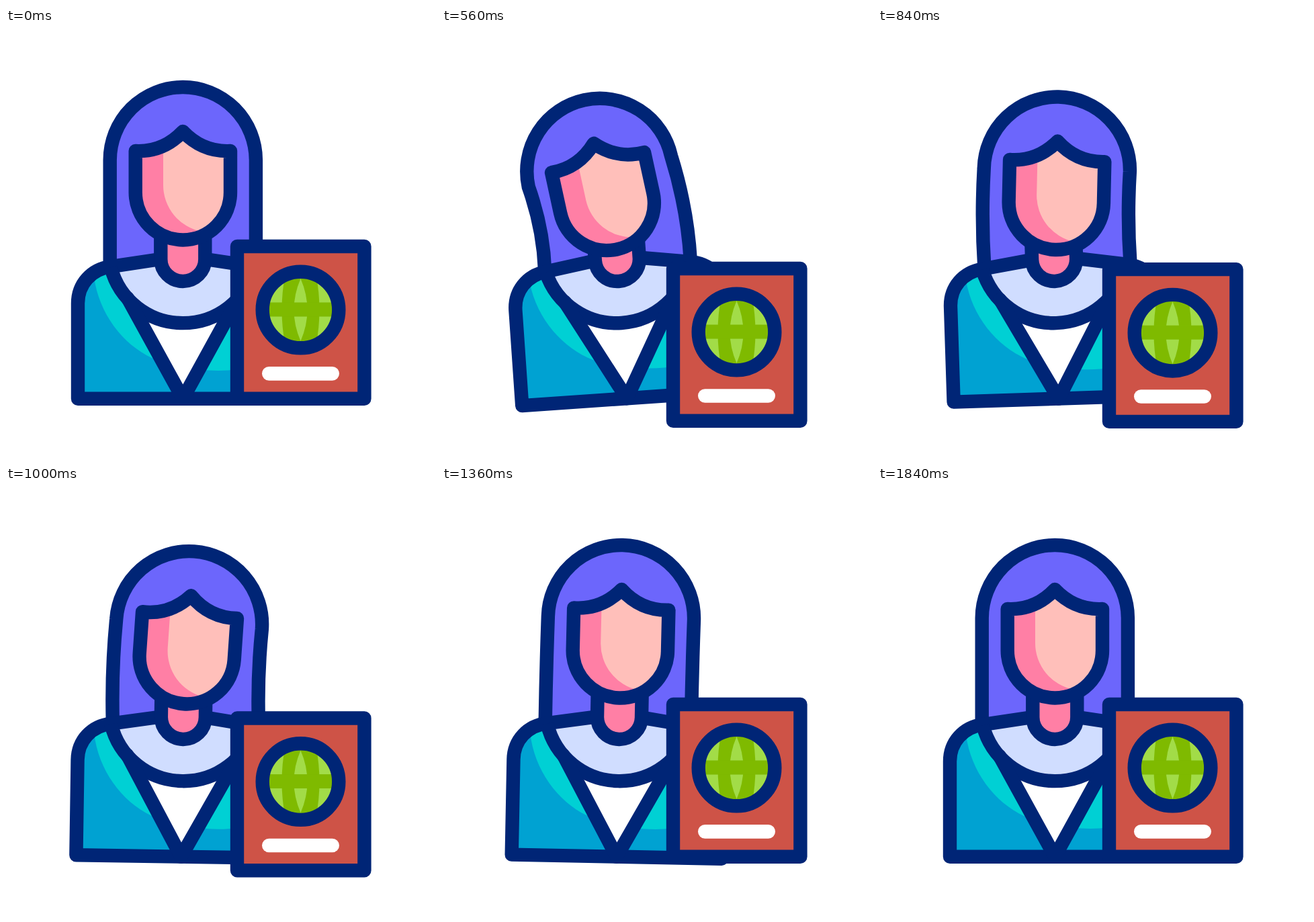
An HTML page that plays this animation: 640x640 px, repeating every 1.96 s.

```html
<!DOCTYPE html>
<html lang="en">
<head>
<meta charset="utf-8">
<title>Traveller with passport</title>
<style>
  html, body { margin: 0; width: 100%; height: 100%; overflow: hidden; background: #fff; }
  svg { display: block; width: 100vw; height: 100vh; }
  .ink { fill: none; stroke: #002576; stroke-width: 20.4; stroke-linejoin: round; }
  .round { stroke-linecap: round; }
</style>
</head>
<body>
<svg viewBox="0 0 640 640">
  <defs>
    <clipPath id="disc"><circle cx="438.5" cy="419.5" r="52"/></clipPath>
    <path id="coat" d="M230 344L156 355.2C127 359 107 381 107 410V551.7H419.6V410C419.6 381 399.6 359 370.6 355.2L296.6 344"/>
    <path id="collar" d="M156 356A110.8 110.8 0 0 0 370.6 356"/>
    <path id="oval" d="M192.7 183Q234 185 263.3 154Q292.6 185 334 183V244.8A70.65 70.65 0 0 1 192.7 244.8Z"/>
  </defs>

  <path id="hair" class="ink" style="fill:#6c66fc"/>

  <g id="body">
    <use href="#coat" fill="#00a2d2"/>
    <path fill="#00d0d4" d="M156 356L131 370C138 425 174 471 217 491C255 505 300 514 345 508L370 356Z"/>
    <path fill="#fff" d="M156 356L263.3 551.7L370.6 356Z"/>
    <path fill="#d0ddff" d="M230 344H296.6L370.6 356H156Z"/>
    <use href="#collar" fill="#d0ddff"/>
    <use href="#coat" class="ink"/>
    <use href="#collar" class="ink"/>
    <path class="ink round" d="M181 402L263.3 551.7L345.6 402"/>
    <path class="ink" style="fill:#ff7fa5" d="M230.3 306V344A33 33 0 0 0 296.3 344V306"/>
  </g>

  <g id="face">
    <use href="#oval" fill="#ffbfba"/>
    <path fill="#ff7fa5" d="M192.7 183Q216 183 234 176V234A70.7 70.7 0 0 0 291 303L263.3 315.5A70.65 70.65 0 0 1 192.7 244.8Z"/>
    <use href="#oval" class="ink"/>
  </g>

  <g id="passport">
    <rect class="ink" style="fill:#ce5347" x="344" y="325" width="189.4" height="226.7"/>
    <g clip-path="url(#disc)">
      <rect x="380" y="360" width="117" height="119" fill="#7fba00"/>
      <g fill="#a2dc48">
        <path d="M380 360H417Q404 419.5 417 479H380Z"/>
        <path d="M497 360H460Q473 419.5 460 479H497Z"/>
        <path d="M438.5 373Q458.5 419.5 438.5 466Q418.5 419.5 438.5 373Z"/>
      </g>
      <rect x="380" y="408.5" width="117" height="21" fill="#7fba00"/>
    </g>
    <circle class="ink" cx="438.5" cy="419.5" r="56.8"/>
    <path class="round" d="M391.3 514.4H485.7" stroke="#fff" stroke-width="20.6"/>
  </g>
</svg>
<script>
  const LOOP = 1960, STEP = 40;
  const CX = 263.3, NECK_Y = 330, CHEST_Y = 380;
  const HAIR_R = 108.6, HAIR_Y = 196.6, HAIR_END = 353;

  const [hair, body, face, passport] = ['hair', 'body', 'face', 'passport']
    .map(id => document.getElementById(id));

  // Smooth step from 0 to 1 between two times
  function ease(t, from, to) {
    const u = Math.min(1, Math.max(0, (t - from) / (to - from)));
    return (1 - Math.cos(Math.PI * u)) / 2;
  }

  // Rises from start to peak, stays for a while, then falls until end
  function hump(t, start, peak, end, hold = 0) {
    return ease(t, start, peak) - ease(t, peak + hold, end);
  }

  function poseAt(t) {
    return {
      headTurn: 4 * hump(t, 500, 960, 1620) - 13 * hump(t, 20, 500, 960),
      headDrop: 15.2 * hump(t, 80, 680, 1280, 90),
      bodyTurn: 2 * hump(t, 620, 1150, 1600) - 4.1 * hump(t, 120, 620, 1150),
      cardDrop: 37 * hump(t, 170, 665, 1300, 75),
      // Hair ends sway sideways while the strands bend
      sway: 3 * hump(t, 80, 320, 560) + 4.5 * hump(t, 570, 850, 1400) - 5 * hump(t, 1250, 1540, 1840),
      bend: 5 * hump(t, 320, 580, 840) - 2.5 * hump(t, 580, 900, 1520)
    };
  }

  function turn(x, y, deg, py, dy = 0) {
    const r = deg * Math.PI / 180, c = Math.cos(r), s = Math.sin(r);
    return [CX + (x - CX) * c - (y - py) * s, py + (x - CX) * s + (y - py) * c + dy];
  }

  function hairPath(p) {
    const [left, right] = [-1, 1].map(side => {
      const x = CX + side * HAIR_R;
      const top = turn(x, HAIR_Y, p.headTurn, NECK_Y, p.headDrop);
      const end = turn(x, HAIR_END, p.bodyTurn, CHEST_Y);
      end[0] += p.sway;
      const mid = [(top[0] + end[0]) / 2 + 2 * p.bend, (top[1] + end[1]) / 2];
      return { top, mid, end };
    });
    return `M${left.end}Q${left.mid} ${left.top}A${HAIR_R} ${HAIR_R} 0 0 1 ${right.top}Q${right.mid} ${right.end}`;
  }

  function draw(t) {
    const p = poseAt(t);
    hair.setAttribute('d', hairPath(p));
    body.setAttribute('transform', `rotate(${p.bodyTurn} ${CX} ${CHEST_Y})`);
    face.setAttribute('transform', `translate(0 ${p.headDrop}) rotate(${p.headTurn} ${CX} ${NECK_Y})`);
    passport.setAttribute('transform', `translate(0 ${p.cardDrop})`);
  }

  const start = performance.now();
  function tick() {
    const t = (performance.now() - start) % LOOP;
    draw(Math.floor(t / STEP) * STEP);
    requestAnimationFrame(tick);
  }
  tick();
</script>
</body>
</html>
```
